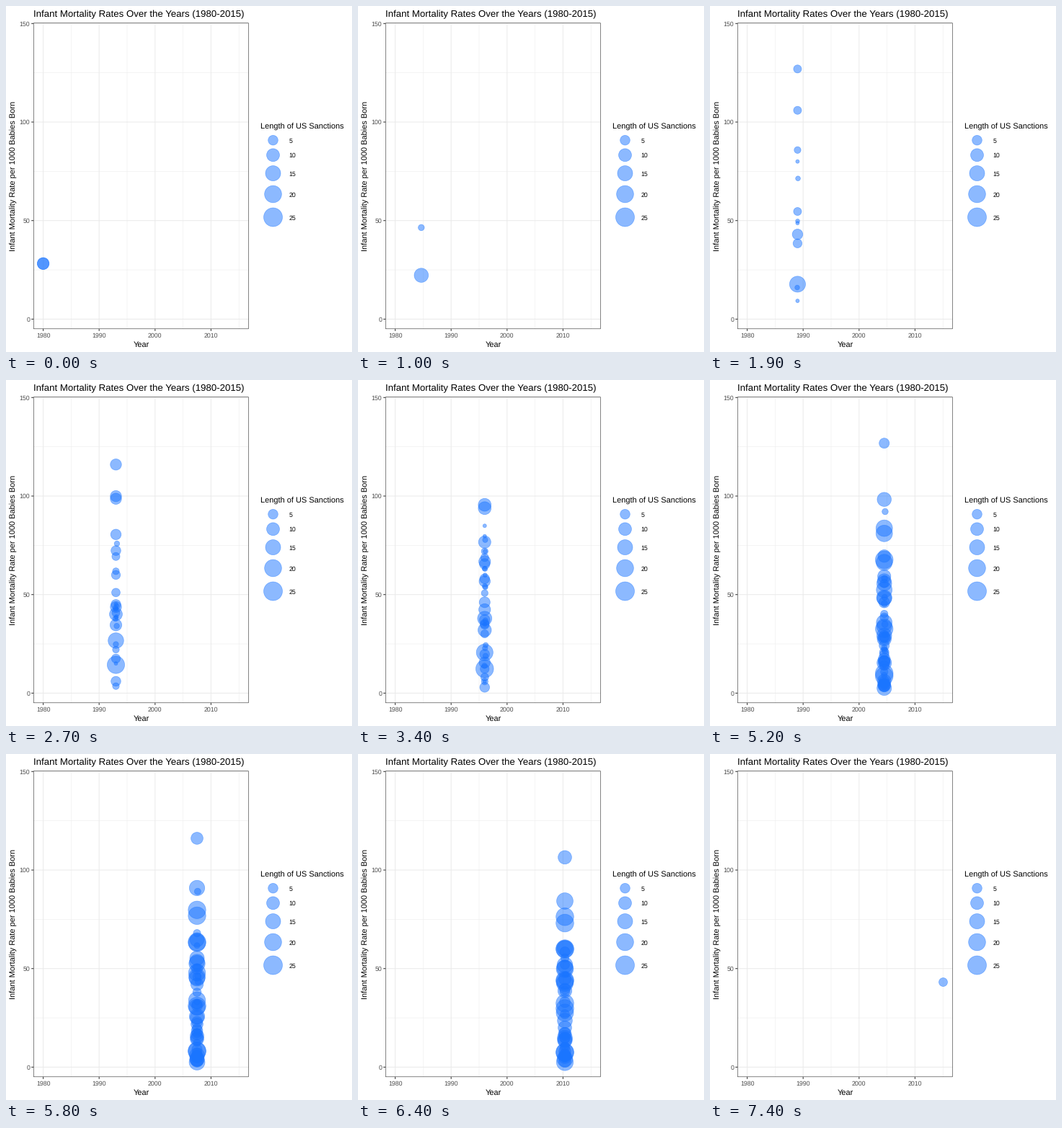
Animation of 480 by 480 pixels, one loop 7.5 s. Source, as a matplotlib script:

```python
import numpy as np
import matplotlib.pyplot as plt
from matplotlib.animation import FuncAnimation
from matplotlib.patches import Rectangle

SIZE, DPI = 480, 96
PT = 72 / DPI
FRAMES, INTERVAL = 75, 100
SPAN, END = 35, 34.5           # 1980 to 2015; most dots stop before the last year
BLUE, GRID, INK, GREY = "#1a75ff", "#ebebeb", "#333333", "#4d4d4d"
LEFT, RIGHT, TOP, BOTTOM = 38.0, 336.7, 23.4, 448.1
RING = 0.71

plt.rcParams["font.family"] = "Liberation Sans"
plt.rcParams["text.hinting"] = "none"


def px(year):
    return 51.6 + 7.76 * year


def py(rate):
    return 434.4 - 2.734 * rate


def radius(length):
    return 2.88 + 2.134 * np.sqrt(np.asarray(length) - 1)


# Leading dots: first year, last year, length at the start, first and last rate
LEADERS = [
    (0, END, 8, 28.2, 7.5),
    (0, 4, 8, 28.2, 19.4),
    (4, END, 1, 47, 28.5),
    (7, 13, 1, 133, 116),
    (7, END, 1, 109, 72),
    (9, END, 1, 80, 40),
    (10, END, 13, 34, 7),
    (10, END, 4, 103.5, 68.5),
    (11, END, 1.5, 54.5, 25),
    (17, END, 15, 79, 55.5),
    (17, END, 5, 118, 76),
    (20, END, 1, 143.5, 94),
    (33, SPAN, 1.6, 44, 43.3),
]


def build_tracks():
    """Leaders, plus lasting and brief sanctions that start each year."""
    rng = np.random.default_rng(7)
    tracks = [row + (0,) for row in LEADERS]
    for year in range(4, 34):
        lasting = min((year - 3) // 3, 3) if year < 29 else 0
        for u in rng.random(lasting):
            first = 3.8 + 84 * u ** 1.7
            last_year = min(END, year + 4 + rng.exponential(14))
            tracks.append((year, last_year, 1, first, first * 0.65, 0))
        brief = round(14 * np.exp(-((year - 18) / 7) ** 2))
        for rate in 10 + 100 * rng.beta(1.3, 1.8, brief):
            tracks.append((year, year + 0.9, 1 + rng.uniform(0, 0.4),
                           rate, rate * 0.98, rng.uniform(-0.1, 0.2)))
    return np.array(tracks)


START, STOP, LENGTH, FIRST, LAST, SHIFT = build_tracks().T
YEARS = np.arange(SPAN + 1)
KEYS = np.round(YEARS * (FRAMES - 1) / SPAN)   # each year falls on a whole frame


def dots_at(frame):
    t = np.interp(frame, KEYS, YEARS)
    left = np.clip((STOP - t) / (STOP - START), 0, 1)
    rate = LAST + (FIRST - LAST) * left ** (1 + 10 / LAST)   # low rates level off
    size = radius(np.clip(LENGTH + t - START, 1, 22))
    on = (START <= t) & (t <= STOP)
    return np.column_stack([px(t + SHIFT), py(rate)])[on], size[on]


def areas(radii):
    return ((2 * np.asarray(radii) - RING) * PT) ** 2


fig = plt.figure(figsize=(SIZE / DPI, SIZE / DPI), dpi=DPI, facecolor="white")
ax = fig.add_axes([0, 0, 1, 1])
ax.set(xlim=(0, SIZE), ylim=(SIZE, 0))
ax.axis("off")


def line(xs, ys, color, width, z):
    ax.plot(xs, ys, color=color, lw=width * PT, zorder=z, snap=False,
            solid_capstyle="butt")


def label(x, y, text, size, color="black", **kw):
    ax.text(x, y, text, fontsize=size * PT, color=color, va="baseline", **kw)


def bubbles(x, y, radii):
    return ax.scatter(x, y, s=areas(radii), color=BLUE, alpha=0.5,
                      linewidths=RING * PT, zorder=3)


# Grid, ticks and frame
for year in range(0, 36, 5):
    major = year % 10 == 0
    line([px(year)] * 2, [TOP, BOTTOM], GRID, 1.07 if major else 0.53, 1)
    if major:
        line([px(year)] * 2, [BOTTOM, BOTTOM + 2.75], INK, 1.07, 4)
        label(px(year), 460.3, str(1980 + year), 8.8, GREY, ha="center")
for rate in range(0, 151, 25):
    major = rate % 50 == 0
    line([LEFT, RIGHT], [py(rate)] * 2, GRID, 1.07 if major else 0.53, 1)
    if major:
        line([LEFT - 2.75, LEFT], [py(rate)] * 2, INK, 1.07, 4)
        label(33.2, py(rate) + 3.3, str(rate), 8.8, GREY, ha="right")
ax.add_patch(Rectangle((LEFT + 0.3, TOP + 0.3), RIGHT - LEFT - 0.6,
                       BOTTOM - TOP - 0.6, fill=False, ec=INK, lw=0.6 * PT,
                       snap=False, zorder=4))

# Titles
label(38, 15, "Infant Mortality Rates Over the Years (1980-2015)", 13.2)
label(187.5, 473, "Year", 11, ha="center")
label(13.5, 236, "Infant Mortality Rate per 1000 Babies Born", 11,
      ha="center", rotation=90, rotation_mode="anchor")

# Legend: gaps between keys follow the key sizes
label(353, 171, "Length of US Sanctions", 11)
lengths = np.arange(5, 26, 5)
sizes = radius(lengths)
rows = 293 - np.append(np.cumsum((sizes[:-1] + sizes[1:])[::-1] * 1.257)[::-1], 0)
rows = 186.2 + (rows - rows[0]) * (293 - 186.2) / (rows[-1] - rows[0])
bubbles([370.5] * len(rows), rows, sizes)
for n, y in zip(lengths, rows):
    label(392.8, y + 3.5, str(n), 8.8)

dots = bubbles([], [], [])


def update(frame):
    spots, radii = dots_at(frame)
    dots.set_offsets(spots)
    dots.set_sizes(areas(radii))
    return (dots,)


anim = FuncAnimation(fig, update, frames=FRAMES, interval=INTERVAL,
                     repeat=True, repeat_delay=0)
plt.show()
```
